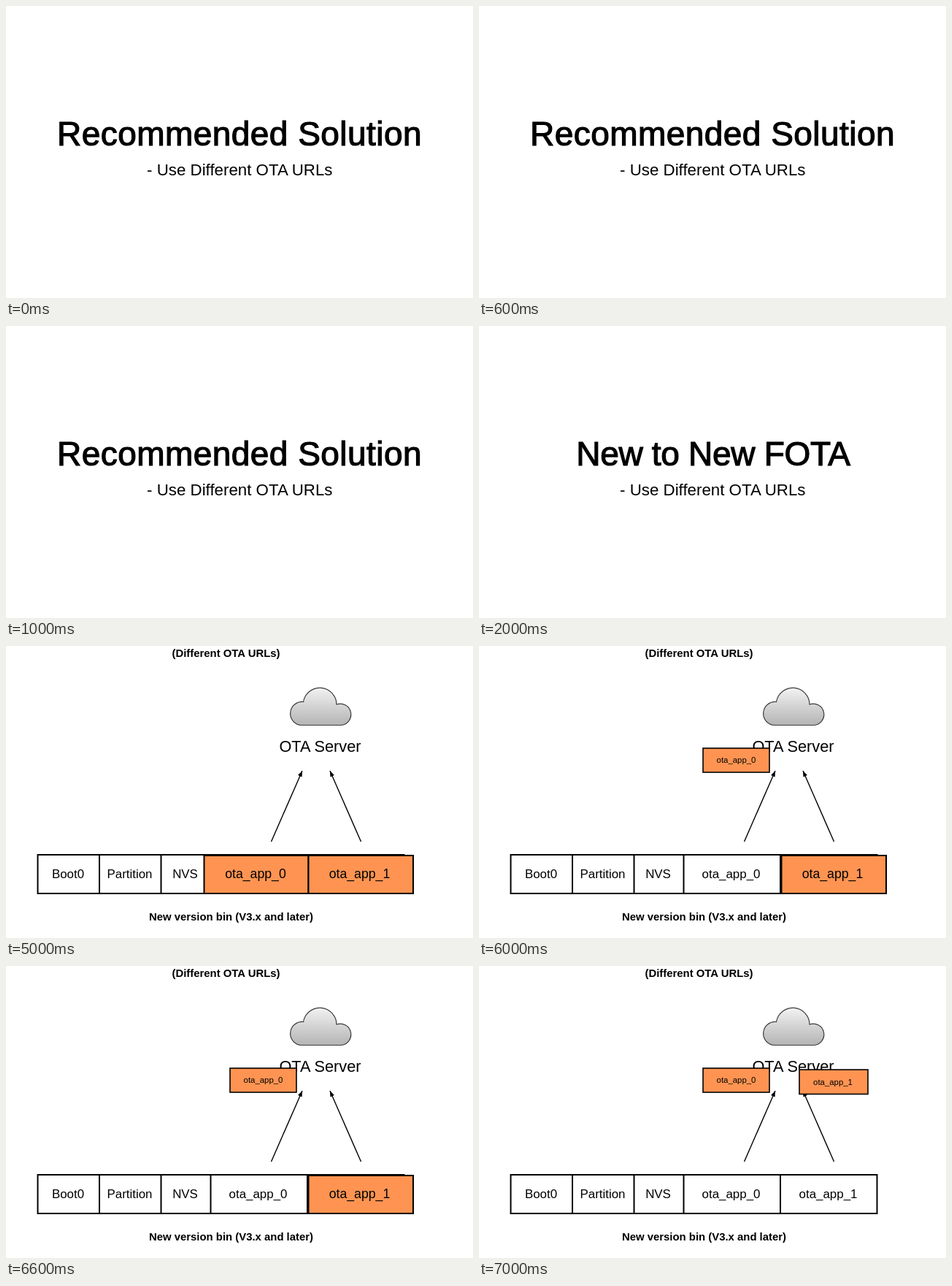
Write an HTML page that moves like this. It is 640 px wide and 400 px high and loops after 8000 ms.

```html
<!DOCTYPE html>
<html lang="en">
<head>
<meta charset="utf-8">
<title>New to New FOTA</title>
<style>
  html, body { margin: 0; width: 100%; height: 100%; overflow: hidden; background: #fff; }
  svg { display: block; width: 640px; height: 400px; }
  text { font-family: "Liberation Sans", Arial, sans-serif; text-anchor: middle; fill: #000; }
  .title { font-size: 46px; letter-spacing: .45px; stroke: #000; stroke-width: 1.2px; }
  .tight { letter-spacing: -.3px; }
  .sub { font-size: 22.3px; }
  .server { font-size: 21.8px; }
  .cell { font-size: 16.9px; }
  .large { font-size: 17.7px; }
  .small { font-size: 11.4px; }
  .note { font-size: 14.9px; font-weight: bold; }
  .line { fill: none; stroke: #000; stroke-width: 2; }
  .app { fill: #ff9452; stroke: #000; stroke-width: 2; }
  .thin { stroke-width: 1.6; }
  .arrow { stroke: #000; stroke-width: 1.4; }

  .step { visibility: hidden; animation: 8s step-end infinite; }
  .intro { animation-name: intro; }
  .first { animation-name: first; }
  .second { animation-name: second; }
  .diagram { animation-name: diagram; }
  .slot0 { animation-name: slot0; }
  .slot1 { animation-name: slot1; }
  .sent0 { animation-name: sent0; }
  .sent1 { animation-name: sent1; }
  @keyframes intro { 0% { visibility: visible } 62.5%, 100% { visibility: hidden } }
  @keyframes first { 0% { visibility: visible } 25%, 100% { visibility: hidden } }
  @keyframes second { 0%, 62.5%, 100% { visibility: hidden } 25% { visibility: visible } }
  @keyframes diagram { 0% { visibility: hidden } 62.5%, 100% { visibility: visible } }
  @keyframes slot0 { 0%, 75%, 100% { visibility: hidden } 62.5% { visibility: visible } }
  @keyframes slot1 { 0%, 87.5%, 100% { visibility: hidden } 62.5% { visibility: visible } }
  @keyframes sent0 { 0% { visibility: hidden } 75%, 100% { visibility: visible } }
  @keyframes sent1 { 0% { visibility: hidden } 87.5%, 100% { visibility: visible } }
</style>
</head>
<body>
<svg viewBox="0 0 640 400">
  <defs>
    <linearGradient id="sky" x1="0" y1="0" x2="0" y2="1">
      <stop offset="0" stop-color="#f2f2f2"/>
      <stop offset="1" stop-color="#b4b4b4"/>
    </linearGradient>
    <marker id="tip" viewBox="0 0 8 6" refX="8" refY="3" markerWidth="8" markerHeight="6"
            markerUnits="userSpaceOnUse" orient="auto">
      <path d="M0 0L8 3L0 6Z"/>
    </marker>
  </defs>

  <text class="title step first" x="320" y="191">Recommended Solution</text>
  <text class="title tight step second" x="321" y="191">New to New FOTA</text>
  <text class="sub step intro" x="320.3" y="232">- Use Different OTA URLs</text>

  <g class="step diagram">
    <text class="note" x="301.5" y="15">(Different OTA URLs)</text>
    <path d="M404 108.5A16 16 0 1 1 407.5 76.5A22.9 22.9 0 0 1 453 80A14.7 14.7 0 1 1 458 108.5Z"
          fill="url(#sky)" stroke="#3c3c3c" stroke-width="1.2"/>
    <text class="server" x="430.5" y="145">OTA Server</text>
    <path class="arrow" d="M363.5 268L406 171" marker-end="url(#tip)"/>
    <path class="arrow" d="M486.5 268L444 171" marker-end="url(#tip)"/>
    <path class="line" d="M43.5 286H545.5V339H43.5ZM128 286V339M212.5 286V339M280.5 286V339M413 286V339"/>
    <g class="cell">
      <text x="85" y="318">Boot0</text>
      <text x="169.5" y="318">Partition</text>
      <text x="245.5" y="318">NVS</text>
      <text x="345.5" y="318">ota_app_0</text>
      <text x="478.5" y="318">ota_app_1</text>
    </g>
    <text class="note" x="308.5" y="376">New version bin (V3.x and later)</text>
  </g>

  <g class="step slot0">
    <rect class="app" x="271.5" y="287" width="143" height="52"/>
    <text class="large" x="342" y="318">ota_app_0</text>
  </g>
  <g class="step slot1">
    <rect class="app" x="414.5" y="287" width="143.5" height="52"/>
    <text class="large" x="484.5" y="318">ota_app_1</text>
  </g>
  <g class="step sent0">
    <rect class="app thin" x="307" y="140" width="91" height="33"/>
    <text class="small" x="352.5" y="160">ota_app_0</text>
  </g>
  <g class="step sent1">
    <rect class="app thin" x="439" y="142" width="94" height="33.5"/>
    <text class="small" x="485" y="163">ota_app_1</text>
  </g>
</svg>
</body>
</html>
```
